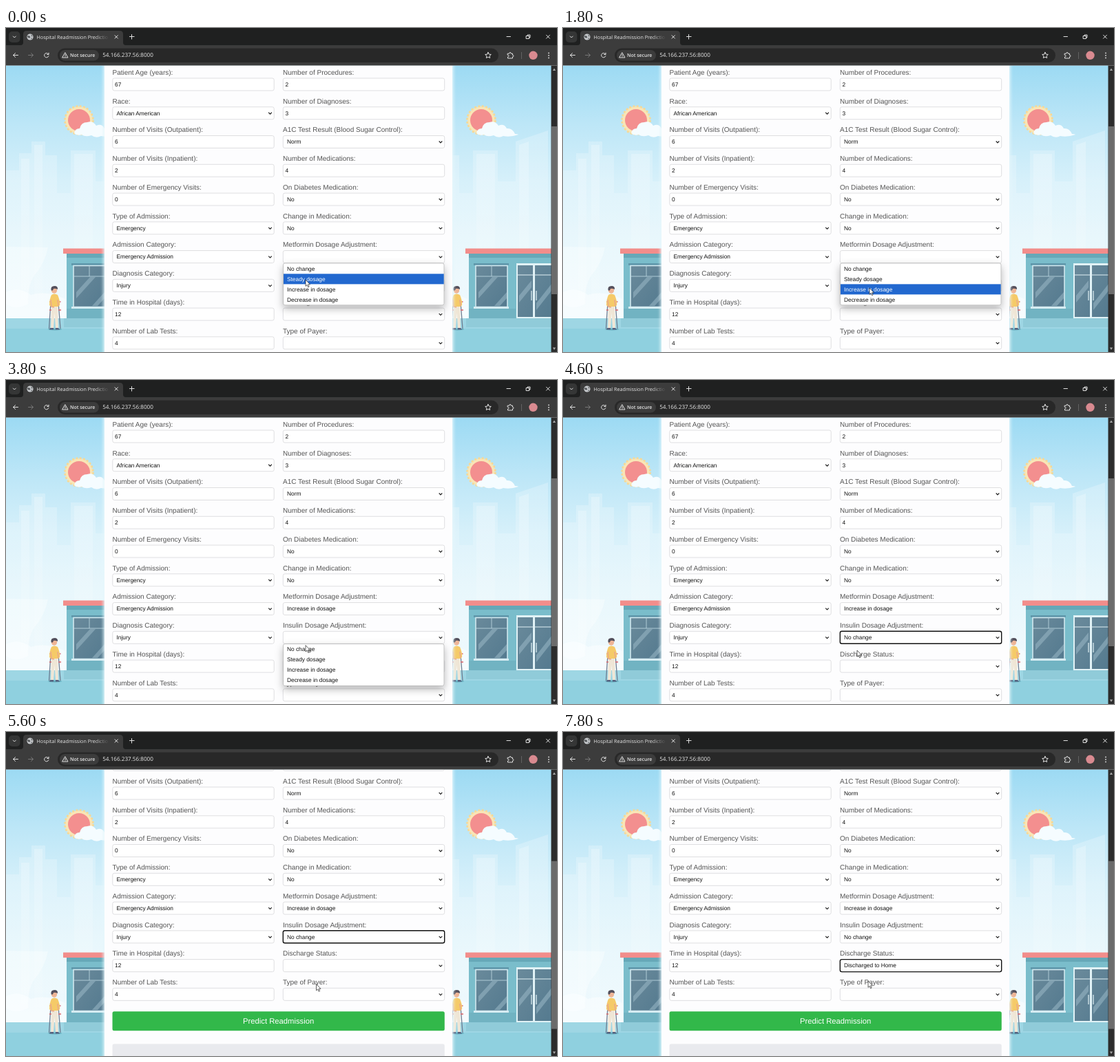
An HTML page that plays this animation: 800x471 px, repeating every 8000 ms.

```html
<!DOCTYPE html>
<html lang="en">
<head>
<meta charset="utf-8">
<title>Hospital Readmission Prediction</title>
<style>
  html, body { margin: 0; width: 100%; height: 100%; overflow: hidden; background: #fff; }
  svg { display: block; width: 100vw; height: 100vh; }
  text { font-family: "Liberation Sans", Arial, sans-serif; text-rendering: geometricPrecision; white-space: pre; }
  .ui text { font-family: "Open Sans", "Noto Sans", sans-serif; fill: #e8e8e8; }
  .label { font-size: 10px; fill: #555; }
  .value { font-size: 8.33px; fill: #111; }
  .line { fill: none; stroke: #e0e0e0; stroke-width: 1; stroke-linecap: round; stroke-linejoin: round; }
</style>
</head>
<body>
<svg id="stage" viewBox="0 0 800 471" preserveAspectRatio="none">
  <defs>
    <linearGradient id="sky" x2="0" y2="1">
      <stop offset="0" stop-color="#9cdaf3"/>
      <stop offset=".2" stop-color="#bce6f7"/>
      <stop offset=".4" stop-color="#d6f0fa"/>
      <stop offset=".6" stop-color="#e5f6fc"/>
      <stop offset=".85" stop-color="#eff9fd"/>
    </linearGradient>
    <linearGradient id="haze" x2="0" y2="1">
      <stop offset="0" stop-color="#fff" stop-opacity=".24"/>
      <stop offset="1" stop-color="#fff" stop-opacity=".08"/>
    </linearGradient>
    <linearGradient id="glass" x2="1" y2="1">
      <stop offset="0" stop-color="#6a8a9b"/>
      <stop offset="1" stop-color="#547a8f"/>
    </linearGradient>
    <linearGradient id="tabFade">
      <stop offset=".8" stop-color="#3c3c3c" stop-opacity="0"/>
      <stop offset="1" stop-color="#3c3c3c"/>
    </linearGradient>
    <filter id="soft" x="-10%" y="-10%" width="120%" height="120%"><feGaussianBlur stdDeviation="2"/></filter>
    <filter id="drop" x="-15%" y="-30%" width="130%" height="180%">
      <feDropShadow dx="0" dy="5" stdDeviation="6" flood-opacity=".28"/>
    </filter>
    <clipPath id="page"><rect y="54.5" width="792" height="417"/></clipPath>

    <g id="scene">
      <g fill="url(#haze)">
        <path d="M0 207h19v-25h18v-17h20v20h17v55h20v-62h36v45h26v-58l47-16v231H0z"/>
        <path d="M22 190h12v210H22zM41 170h12v230H41zM99 183h27v217H99zM161 170l14-5v235h-14z"/>
      </g>
      <path d="M0 318l61 1q-5 24-20 41-10 15-9 41-18 10-32 0z" fill="#fff" opacity=".32"/>
      <path d="M0 384q18-9 36 4 24-7 50 6v30H0z" fill="#fff" opacity=".4"/>
      <circle cx="106" cy="134" r="20" fill="#f9e5b6"/>
      <circle cx="106" cy="134" r="20.500" fill="none" stroke="#f6d996" stroke-width="2.600" stroke-dasharray="3 2.37"/>
      <circle cx="106" cy="134" r="16" fill="#f38f8f"/>
      <path d="M99 153q1-7 8-7 2-9 11-9 8-3 13 5 8-4 12 4 8-1 12 8 4 0 5 1-12 4-22 2-7 4-14-1-9 3-14-1-7 2-11-2z" fill="#f5fcff"/>
      <path d="M0 422h210v15H0z" fill="#9ed6e4"/>
      <path d="M0 437h210v34H0z" fill="#8fd0df"/>
      <path d="M88 328h122v94H88z" fill="#7abdcb"/>
      <path d="M88 328h122v6H88z" fill="#66a8b8"/>
      <path d="M88 408h68v14H88z" fill="#71b3c2"/>
      <path d="M83 320.500h127v7.500H83z" fill="#f28d8b"/>
      <path d="M84 422h126v13H84z" fill="#90cbd9"/>
      <path d="M95 342h51v3H95z" fill="#5f97aa"/>
      <path d="M98 345.500h46v60H98z" fill="url(#glass)" stroke="#d6ecf2" stroke-width="1.500"/>
      <path d="M98 361h46M121 345v16" stroke="#c3dde6" stroke-width=".8"/>
      <path d="M102 384l20-22h8l-28 31zM125 404l18-20v9l-10 11z" fill="#9fbecb" opacity=".5"/>
      <path d="M95 405h51v3H95z" fill="#d6ecf2"/>
      <path d="M157 342h53v80h-53z" fill="#e1f2f6"/>
      <path d="M159 345h22v75h-22zM184 345h26v75h-26z" fill="url(#glass)"/>
      <path d="M159 359h51" stroke="#e1f2f6" stroke-width="1.200"/>
      <path d="M161 389l18-22v10l-18 22zM186 400l22-28v10l-22 28z" fill="#9fbecb" opacity=".5"/>
      <path d="M179 382v14M186 382v14" stroke="#e1f2f6" stroke-width="1.200"/>
      <ellipse cx="71" cy="438" rx="10" ry="1.500" fill="#62a9bb"/>
      <path d="M65 399l-2.500 38M76 399l3 38" stroke="#6d7c90" stroke-width="1.300"/>
      <path d="M63 398h4M74.500 398h5M63 410h3M76 410h4" stroke="#d8646a" stroke-width="1.600"/>
      <path d="M66 404h9l1 32h-4l-1.500-22-1.500 22h-4z" fill="#efe6d6"/>
      <path d="M64 436h5v2.500h-6zM72 436h4l2 2.500h-6z" fill="#55617e"/>
      <path d="M66 388q4-3 9 0 4 9 3 15l-2 2H65l-2-2q0-9 3-15z" fill="#f5ca68"/>
      <path d="M65 395l1 10 4 1M75 395l1 9" fill="none" stroke="#e9a98a" stroke-width="1.600"/>
      <circle cx="70" cy="381.500" r="4.200" fill="#eeb596"/>
      <path d="M65.500 381q-1-6 5-6 5 0 4.500 5-4-2-6-1-1 4-3.500 2z" fill="#54505c"/>
    </g>
  </defs>

  <g clip-path="url(#page)">
    <rect y="54" width="792" height="417" fill="url(#sky)"/>
    <use href="#scene"/>
    <use href="#scene" x="584"/>
    <rect x="141.500" y="40" width="508" height="450" fill="#e6f7fc" filter="url(#soft)"/>
    <rect x="143" y="54" width="505" height="417" fill="#fdfdfe"/>
    <g id="form"></g>
    <g id="menu" filter="url(#drop)"></g>
  </g>

  <g id="scrollbar">
    <rect x="791.500" y="54.500" width="8.500" height="417" fill="#2c2c2c"/>
    <rect id="thumb" x="792" y="143" width="8" height="244" fill="#6b6b6b"/>
    <path d="M793.800 62l2.200-3.500 2.200 3.500zM793.800 464.500l2.200 3.500 2.200-3.500z" fill="#a5a5a5"/>
  </g>

  <g class="ui">
    <rect width="800" height="26" fill="#1f2020"/>
    <rect y="25" width="800" height="29.500" fill="#3c3c3c"/>
    <path d="M21 25q4 0 4-4V9q0-5 5-5h135q5 0 5 5v12q0 4 4 4z" fill="#3c3c3c"/>
    <rect x="4" y="5" width="16.500" height="16" rx="5" fill="#353636"/>
    <path class="line" d="M10.300 12l2 2 2-2"/>
    <circle cx="35" cy="13" r="4.600" fill="#c7cacd"/>
    <path d="M31.500 11l3 .5 1 2-2 1.500-2.500-2zM36 9.500l2.500 1.500-1 2zM36 15l2-1-1 3z" fill="#5a5d60"/>
    <text x="44.500" y="15.800" font-size="7.200">Hospital Readmission Predictio</text>
    <rect x="44" y="6" width="106" height="14" fill="url(#tabFade)"/>
    <path class="line" d="M158 10.700l4.400 4.400M162.400 10.700l-4.400 4.400M179.500 12.500h6.600M182.500 9.500v6.600"/>
    <path class="line" d="M727 12.500h5.500M755.500 11.500h4v4h-4zM757 11.300v-1.300h4v4h-1.300M784.500 10.200l5 5M789.500 10.200l-5 5"/>
    <path class="line" d="M17.500 39.500H10.500M13.500 36.500l-3 3 3 3"/>
    <path class="line" d="M32.500 39.500h7M36.500 36.500l3 3-3 3" style="stroke:#777"/>
    <path class="line" d="M61.700 38.200a3.200 3.200 0 1 0 .2 2.500M62 36.200v2.300h-2.300"/>
    <rect x="75" y="29.500" width="640" height="20.500" rx="10.250" fill="#282828"/>
    <rect x="78" y="32" width="57" height="15.500" rx="7.750" fill="#3c3c3c"/>
    <path class="line" d="M86 36l4 7h-8zM86 38.600v1.800M86 41.700v.1"/>
    <text x="93" y="42.300" font-size="6.950" font-weight="600">Not secure</text>
    <text x="140.200" y="42.400" font-size="8.150">54.166.237.56:8000</text>
    <path class="line" d="M700 35.300l1.300 2.800 3 .4-2.200 2.100.5 3-2.600-1.400-2.600 1.400.5-3-2.200-2.100 3-.4z"/>
    <path class="line" d="M728.500 37.200h2.200q0-1.700 1.300-1.700t1.300 1.700h2.200v2.200q1.500 0 1.500 1.200t-1.500 1.200v2.200h-7v-2q1.700-.2 1.700-1.400t-1.700-1.400z"/>
    <path d="M748.500 35v10" stroke="#626262"/>
    <circle cx="765.500" cy="39.800" r="6.200" fill="#d98a90"/>
    <path d="M788 36.300v.1M788 39.800v.1M788 43.300v.1" class="line" style="stroke-width:1.800"/>
  </g>
  <path id="cursor" d="M0 0v9.300l2.100-1.900 1.500 3.300 1.500-.7-1.500-3.200h2.900z" fill="#fff" stroke="#222" stroke-width=".7"/>
</svg>

<script>
const LOOP = 8000, STEP = 200;
const FIRST_Y = 82.2, PITCH = 41.76, BOX_W = 235, BOX_H = 18;
const BORDER = { stroke: "#d2d2d5", "stroke-width": .7 };
const FOCUS = { stroke: "#101010", "stroke-width": 1.4 };
const $ = id => document.getElementById(id);
const setAttrs = (el, attrs) => Object.entries(attrs).forEach(([k, v]) => el.setAttribute(k, v));

// Each field: label, value, and 1 when it is a drop-down.
const columns = [
  { x: 154.5, fields: [
    ["Patient Age (years):", "67"], ["Race:", "African American", 1],
    ["Number of Visits (Outpatient):", "6"], ["Number of Visits (Inpatient):", "2"],
    ["Number of Emergency Visits:", "0"], ["Type of Admission:", "Emergency", 1],
    ["Admission Category:", "Emergency Admission", 1], ["Diagnosis Category:", "Injury", 1],
    ["Time in Hospital (days):", "12"], ["Number of Lab Tests:", "4"]] },
  { x: 402, fields: [
    ["Number of Procedures:", "2"], ["Number of Diagnoses:", "3"],
    ["A1C Test Result (Blood Sugar Control):", "Norm", 1], ["Number of Medications:", "4"],
    ["On Diabetes Medication:", "No", 1], ["Change in Medication:", "No", 1],
    ["Metformin Dosage Adjustment:", "", 1], ["Insulin Dosage Adjustment:", "", 1],
    ["Discharge Status:", "", 1], ["Type of Payer:", "", 1]] }
];

const dosages = ["No change", "Steady dosage", "Increase in dosage", "Decrease in dosage"];
const discharges = ["Discharged to Home", "Transfers to Other Healthcare Facilities",
  "AMA (Against Medical Advice)", "Other"];

// Drop-down use: row, options, open and pick times, picked option, time focus is lost, hover changes.
const picks = [
  { row: 6, options: dosages, open: 0, pick: 2400, choice: 2, blur: 3400, hover: [[0, 1], [1600, 2]] },
  { row: 7, options: dosages, open: 3400, pick: 4400, choice: 0, blur: 6200, hover: [[4000, 0]] },
  { row: 8, options: discharges, open: 6200, pick: 7200, choice: 0, blur: LOOP, hover: [[6800, 0]] }
];

const cursorPath = [[0, 435, 366], [1000, 435, 366], [1600, 445, 378], [2200, 445, 378],
  [3000, 439, 382], [3600, 439, 382], [4200, 427, 393], [5200, 427, 393], [6000, 474, 340],
  [6400, 474, 340], [7000, 448, 355], [7200, 448, 355], [7800, 443, 362]];
const scrollPath = [[4600, 0], [4800, 48], [5000, 75.6], [5200, 76.5]];

const rowY = row => FIRST_Y + row * PITCH;

function fieldMarkup([label, value, isSelect], row, x) {
  const y = rowY(row);
  const arrow = isSelect
    ? `<path d="M${x + 226.7} ${y - 1.2}l2.300 2.300 2.300-2.300" fill="none" stroke="#222" stroke-width="1.200"/>` : "";
  const key = x > 400 ? row : "L" + row;
  return `<text class="label" x="${x}" y="${y - 14.4}">${label}</text>
    <rect id="box${key}" x="${x + .3}" y="${y - .2 - BOX_H / 2}" width="${BOX_W - .6}" height="${BOX_H}" rx="2.500"
      fill="#fff" stroke="${BORDER.stroke}" stroke-width="${BORDER["stroke-width"]}"/>
    <text class="value" id="value${key}" x="${x + (isSelect ? 6 : 3.5)}" y="${y + 2.6}">${value}</text>${arrow}`;
}

$("form").innerHTML = columns.map(c => c.fields.map((f, i) => fieldMarkup(f, i, c.x)).join("")).join("") +
  `<rect x="154.500" y="482.700" width="482.300" height="28" rx="2.500" fill="#32b84a"/>
   <text x="395.600" y="500.700" font-size="11.250" fill="#fff" text-anchor="middle">Predict Readmission</text>
   <rect x="154.500" y="529.900" width="482.300" height="60" rx="2.500" fill="#e9eaee"/>`;

function menuMarkup(pick, hovered, scroll) {
  const top = rowY(pick.row) - scroll + 9.1;
  const items = pick.options.map((text, i) => {
    const y = top + .5 + i * 15, on = i === hovered;
    return (on ? `<rect x="403" y="${y}" width="232.700" height="15" fill="#2068cf"/>` : "") +
      `<text class="value" x="408" y="${y + 10.3}" style="fill:${on ? "#fff" : "#111"}">${text}</text>`;
  });
  return `<rect x="402.500" y="${top}" width="233.500" height="61" rx="2.500" fill="#fff" stroke="#aaa" stroke-width=".7"/>` +
    items.join("");
}

function along(path, t) {
  const next = path.findIndex(p => p[0] > t);
  if (next === 0) return path[0].slice(1);
  if (next < 0) return path[path.length - 1].slice(1);
  const a = path[next - 1], b = path[next], k = (t - a[0]) / (b[0] - a[0]);
  return a.slice(1).map((v, i) => v + (b[i + 1] - v) * k);
}

function render(t) {
  const [scroll] = along(scrollPath, t);
  const [x, y] = along(cursorPath, t);
  $("form").setAttribute("transform", `translate(0 ${-scroll})`);
  $("thumb").setAttribute("y", 143 + scroll * .583);
  $("cursor").setAttribute("transform", `translate(${x} ${y})`);

  let menu = "";
  for (const p of picks) {
    const focused = t >= p.pick && t < p.blur;
    setAttrs($("box" + p.row), focused ? FOCUS : BORDER);
    $("value" + p.row).textContent = t >= p.pick ? p.options[p.choice] : "";
    if (t >= p.open && t < p.pick) {
      const hovered = p.hover.reduce((last, [at, item]) => t >= at ? item : last, -1);
      menu = menuMarkup(p, hovered, scroll);
    }
  }
  $("menu").innerHTML = menu;
}

let shown = -1;
function tick() {
  const t = Math.floor(performance.now() % LOOP / STEP) * STEP;
  if (t !== shown) render(shown = t);
  requestAnimationFrame(tick);
}
tick();
</script>
</body>
</html>
```
